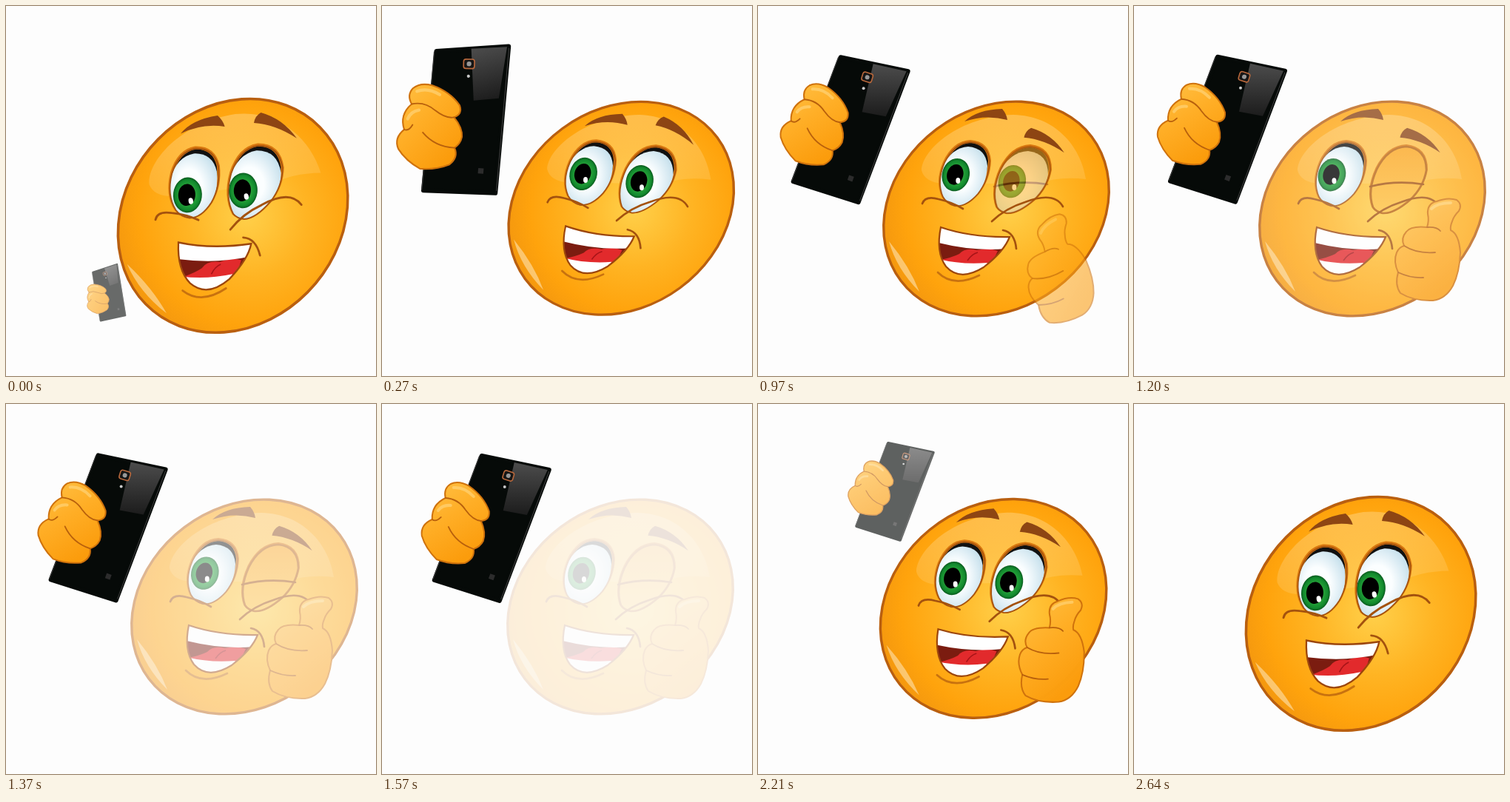
Recreate the animation shown at these times as an HTML page. Size 500 by 500 pixels, loop 2800 ms.

```html
<!DOCTYPE html>
<html lang="en">
<head>
<meta charset="utf-8">
<title>Selfie smiley</title>
<style>
html, body { margin: 0; width: 100%; height: 100%; overflow: hidden; background: #fdfdfd; }
svg { display: block; width: 100vw; height: 100vh; }
.line { fill: none; stroke: #a4520e; stroke-width: 2.7; stroke-linecap: round; }
.lid { fill: #111; stroke: #d9780f; stroke-width: 4; }
.rim { fill: none; stroke: #a4520e; stroke-width: 1.6; }
.skin { fill: url(#skin); stroke: #cf720c; stroke-width: 2; stroke-linejoin: round; }
.crease { fill: none; stroke: #b8600c; stroke-width: 1.8; stroke-linecap: round; }
.glow { fill: none; stroke: #ffdc8a; stroke-width: 4; stroke-linecap: round; opacity: .55; }
.brow { fill: #8d4513; }
</style>
</head>
<body>
<svg viewBox="0 0 500 500">
  <defs>
    <radialGradient id="ball" gradientUnits="userSpaceOnUse" cx="335" cy="285" r="175">
      <stop offset="0" stop-color="#ffd04a"/>
      <stop offset=".45" stop-color="#ffb423"/>
      <stop offset=".8" stop-color="#ffa30c"/>
      <stop offset="1" stop-color="#f4980f"/>
    </radialGradient>
    <linearGradient id="gloss" x1="0" y1="0" x2="0" y2="1">
      <stop offset="0" stop-color="#fff3d0" stop-opacity=".3"/>
      <stop offset="1" stop-color="#fff3d0" stop-opacity=".14"/>
    </linearGradient>
    <linearGradient id="skin" x1="0" y1="0" x2=".5" y2="1">
      <stop offset="0" stop-color="#ffc247"/>
      <stop offset=".5" stop-color="#ffae26"/>
      <stop offset="1" stop-color="#fb9c0c"/>
    </linearGradient>
    <radialGradient id="white" cx=".45" cy=".45" r=".58">
      <stop offset=".4" stop-color="#fbfeff"/>
      <stop offset="1" stop-color="#c6e0ec"/>
    </radialGradient>
    <radialGradient id="green">
      <stop offset=".5" stop-color="#2aa53a"/>
      <stop offset=".85" stop-color="#128a2e"/>
      <stop offset="1" stop-color="#0a5a1e"/>
    </radialGradient>
    <linearGradient id="shut" x1="0" y1="0" x2="0" y2="1">
      <stop offset="0" stop-color="#fba51f"/>
      <stop offset="1" stop-color="#ffc13c"/>
    </linearGradient>
    <linearGradient id="shine" x1="0" y1="0" x2="0" y2="1">
      <stop offset="0" stop-color="#4c4c4c"/>
      <stop offset="1" stop-color="#1c1c1c"/>
    </linearGradient>
    <path id="left" d="M250 258Q241 238 252 212Q265 185 287 184Q311 186 313 210Q312 235 297 254Q281 272 266 270Q255 267 250 258Z"/>
    <path id="right" d="M323 272Q315 250 328 221Q343 191 368 190Q395 193 395 222Q391 245 373 262Q351 281 336 280Q327 278 323 272Z"/>
    <path id="lips" d="M247 299Q288 313 340 312Q333 331 305 353Q273 373 254 352Q240 333 247 299Z"/>
    <clipPath id="inL"><use href="#left"/></clipPath>
    <clipPath id="inR"><use href="#right"/></clipPath>
    <clipPath id="mouth"><use href="#lips"/></clipPath>
    <g id="iris">
      <g transform="rotate(16)">
        <ellipse rx="18.5" ry="22.5" fill="url(#green)"/>
        <ellipse cx="-1" rx="11" ry="14"/>
      </g>
      <ellipse cx="3" cy="8" rx="3" ry="4" fill="#fff"/>
    </g>
  </defs>

  <g id="all">
    <g id="face">
      <ellipse cx="322" cy="274" rx="161.5" ry="134.5" transform="rotate(-37 322 274)"
        fill="url(#ball)" stroke="#b95f10" stroke-width="3.4"/>
      <path fill="url(#gloss)" d="M221 222C222 194 272 149 345 147C400 148 436 188 443 234Q405 230 380 240L250 240Q225 238 221 222Z"/>
      <path fill="#fff2d0" opacity=".5" d="M177 318Q187 355 218 386Q205 352 177 318Z"/>

      <use href="#left" class="lid" y="-1"/>
      <g clip-path="url(#inL)">
        <use href="#left" fill="url(#white)" x="-3" y="6"/>
        <use href="#iris" id="lookL"/>
      </g>
      <use href="#left" class="rim"/>
      <use href="#right" class="lid" y="-1"/>
      <g clip-path="url(#inR)">
        <use href="#right" fill="url(#white)" x="-3" y="6"/>
        <use href="#iris" id="lookR"/>
      </g>
      <use href="#right" class="rim"/>
      <g id="wink">
        <use href="#right" fill="url(#shut)" stroke="#b8630f" stroke-width="2.6"/>
        <path class="line" d="M319 244Q354 235 391 241"/>
      </g>

      <path id="browL" class="brow" d="M271 163Q288 147 322 146Q328 153 329 161Q300 153 271 163Z"/>
      <path id="browR" class="brow" d="M367 161Q370 152 378 149Q405 160 419 187Q394 166 367 161Z"/>

      <path class="line" d="M222 267Q226 256 244 261Q262 265 277 274"/>
      <path class="line" d="M316 291Q335 273 361 265Q400 250 412 271"/>
      <g clip-path="url(#mouth)">
        <rect x="235" y="290" width="115" height="85" fill="#7b1c10"/>
        <path fill="#e22a2c" d="M246 343Q262 340 272 335Q280 326 296 330Q312 326 324 331L310 360L258 360Z"/>
        <path d="M283 344Q289 335 297 333" fill="none" stroke="#a81418" stroke-width="1.6"/>
        <path fill="#fff" d="M240 290L345 300L335 328Q290 332 240 319Z"/>
        <path fill="#fff" d="M244 342Q276 350 310 347L296 375L250 372Z"/>
      </g>
      <use href="#lips" fill="none" stroke="#9c460c" stroke-width="2.2"/>
      <path class="line" d="M331 303Q347 306 349 328"/>
      <path class="line" style="stroke:#c8720f" d="M243 360Q264 381 299 364"/>

      <g id="thumb">
        <path class="skin" d="M396 299Q399 290 397 281Q396 267 409 264Q424 258 436 262Q444 268 439 277Q432 284 430 291Q427 298 428 303Q439 308 441 333Q440 360 431 378Q421 396 404 398Q378 399 360 388Q352 377 357 360Q350 345 355 333Q358 326 365 324Q360 314 368 305Q374 297 396 299Z"/>
        <path class="crease" d="M365 324Q382 335 407 333M357 360Q374 368 391 367M396 299Q409 298 414 304"/>
        <path class="glow" d="M402 274Q410 266 428 266"/>
      </g>
    </g>
  </g>

  <g id="phone">
    <path d="M135 76L226 95L159 272L71 244Z" fill="#060a08" stroke="#060a08" stroke-width="6" stroke-linejoin="round"/>
    <path d="M132 76L69 243M226 97L161 270" stroke="#363636" stroke-width="1.2"/>
    <path d="M179 85L224 95L196 156L164 150Z" fill="url(#shine)"/>
    <g transform="rotate(17 171 103)">
      <rect x="164" y="97" width="14" height="12" rx="3" fill="#161616" stroke="#b8683c" stroke-width="1.6"/>
      <circle cx="171" cy="103" r="3" fill="#999"/>
    </g>
    <circle cx="166" cy="118" r="2" fill="#c8c8c8"/>
    <rect x="145" y="236" width="7" height="7" fill="#2c2c2c" transform="rotate(20 148 240)"/>
    <path class="skin" d="M86 133Q83 120 93 114Q104 109 118 117Q138 131 145 151Q146 163 134 164Q141 180 137 191Q133 199 124 202Q126 215 112 221Q92 223 74 216Q59 201 54 184Q52 169 68 162Q67 142 86 133Z"/>
    <path class="crease" d="M86 133Q103 134 113 149Q123 163 134 164M90 172Q100 194 124 202M68 162Q73 166 80 159"/>
    <path class="glow" d="M97 119Q112 118 124 131M76 150Q82 142 93 143"/>
  </g>
</svg>
<script>
const LOOP = 2800;
const el = id => document.getElementById(id);
const mix = (a, b, p) => a + (b - a) * p;
const ramp = (t, from, to) => Math.min(1, Math.max(0, (t - from) / (to - from)));
const smooth = p => p * p * (3 - 2 * p);
// Runs past the end and settles back
const swing = p => p + .6 * Math.sin(Math.PI * p) ** 2;

const move = (id, x, y, more = "") =>
  el(id).setAttribute("transform", `translate(${x} ${y}) ${more}`);
const fade = (id, a) => el(id).setAttribute("opacity", a);

function drawPhone(t, enter, sway) {
  const grow = swing(enter), leave = ramp(t, 2140, 2300);
  const lift = 6 * smooth(ramp(t, 570, 1070)) + 1.5 * sway;
  const x = mix(139, 147.5, enter) - 30 * Math.sin(Math.PI * enter) - 26 * sway + 83 * leave;
  const y = mix(388, 171.5, grow) - lift - 110 * leave;
  const size = mix(.37, 1, grow) - .75 * leave;
  move("phone", x, y, `rotate(${-30 * (1 - enter)}) scale(${size}) translate(-147.5 -171.5)`);
  fade("phone", Math.min(1, .6 + 2 * enter) - leave ** 1.25);
}

// upright: 0 = leaning pose, 1 = upright pose
function drawFace(t, upright, sway) {
  const lean = 1 - upright;
  const m = [1 + .035 * lean, -.129 * lean, .161 * lean, 1 + .058 * lean];
  move("face", 247 - 14 * lean, 299 + 20.5 * lean, `matrix(${m} 0 0) translate(-247 -299)`);

  move("lookL", 270 - 2 * lean - 3 * sway, 229 + 12 * lean - sway);
  move("lookR", 346 - 6 * lean - 3 * sway, 238 + 6 * lean - sway);

  const brow = ramp(t, 570, 900) - ramp(t, 2140, 2400);
  move("browL", 8 * brow, -7 * brow);
  move("browR", -7 * brow, 14 * brow, `rotate(${-6 * brow} 393 168)`);

  const show = ramp(t, 840, 1070) - ramp(t, 2210, 2400), away = 1 - show;
  move("thumb", 32 * away, 42 * Math.sqrt(away), `rotate(${-60 * away} 397 350)`);
  fade("thumb", show);
  fade("wink", ramp(t, 840, 1070) - ramp(t, 1610, 1740));
  fade("all", 1 - .86 * (ramp(t, 1085, 1530) - ramp(t, 1600, 1790)));
}

function draw(t) {
  const enter = ramp(t, 30, 530);
  const sway = smooth(ramp(t, 570, 1070)) - smooth(ramp(t, 1070, 1600));
  drawPhone(t, enter, sway);
  drawFace(t, swing(enter) - swing(ramp(t, 2140, 2640)), sway);
}

const start = performance.now();
function tick(now) {
  draw(Math.max(0, now - start) % LOOP);
  requestAnimationFrame(tick);
}
draw(0);
requestAnimationFrame(tick);
</script>
</body>
</html>
```
